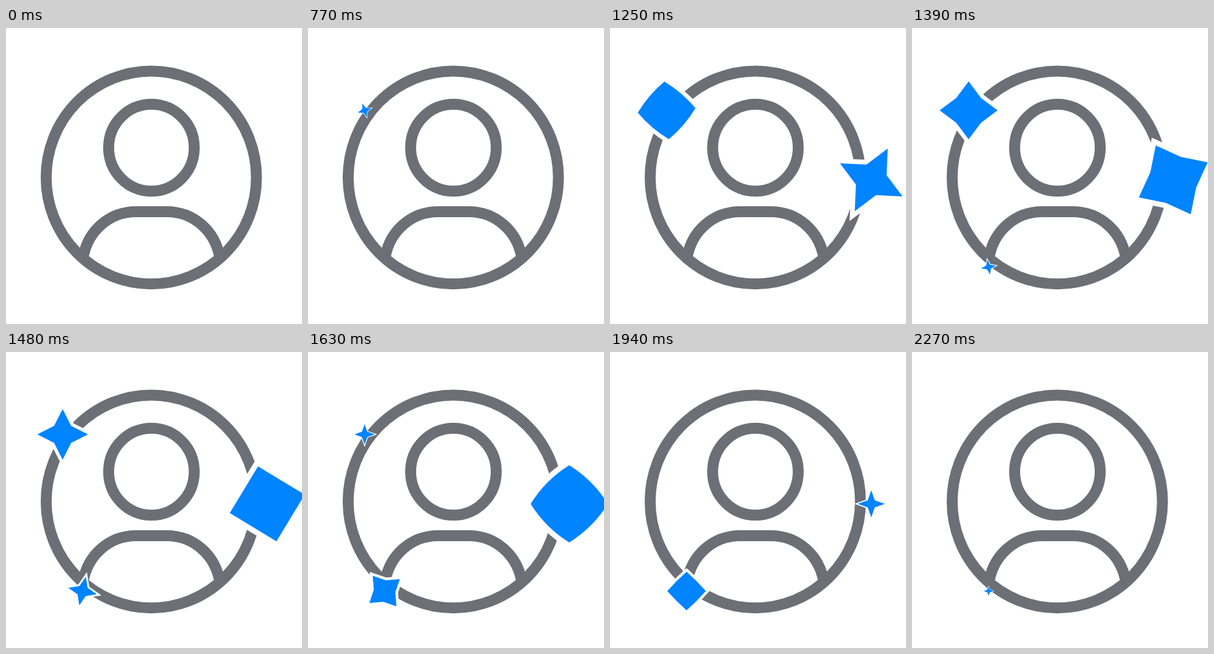
Write an HTML page that moves like this. It is 460x460 px and loops after 2340 ms.

```html
<!DOCTYPE html>
<html lang="en">
<head>
<meta charset="utf-8">
<title>Sparkling avatar</title>
<style>
  html, body { margin: 0; width: 100%; height: 100%; overflow: hidden; background: #fff; }
  svg { display: block; width: 100%; height: 100%; }
  .icon { fill: none; stroke: #6c6f76; stroke-width: 17; }
  .spark { fill: #0084ff; stroke: #fff; stroke-miterlimit: 4; paint-order: stroke; }
</style>
</head>
<body>
<svg viewBox="0 0 460 460">
  <g class="icon">
    <path d="M120 356C127 316 160 285.5 202 285.5H250C292 285.5 325 316 332 356"/>
    <ellipse cx="226" cy="186" rx="66.5" ry="67.5"/>
    <ellipse cx="225.8" cy="232.3" rx="163.4" ry="165.4"/>
  </g>
  <path class="spark"/>
  <path class="spark"/>
  <path class="spark"/>
</svg>
<script>
const LOOP = 2340;
const START = 755;
const POSE = 78.5; // each pose is held this long
// A sparkle's life, counted in poses
const GROWN = 3, SETTLED = 7, FADE = 8, END = 12;

const nodes = document.querySelectorAll('.spark');
const sparks = [
  { x: 88, y: 128, r: 45, first: 0 },
  { x: 406, y: 236, r: 60, first: 4 },
  { x: 119, y: 371.5, r: 30, first: 7.7 }
];

const clamp = v => Math.min(1, Math.max(0, v));
const smooth = v => v * v * (3 - 2 * v);

function sizeAt(age) {
  const grow = 1 - .75 * clamp(1 - age / GROWN) ** 2;
  const fade = 1 - clamp((age - FADE) / (END - FADE)) ** 1.5;
  return Math.min(grow, fade);
}

// Distance from the centre to the middle of each side; the tips are at 1.
function waistAt(age) {
  const swell = age < SETTLED
    ? smooth(age / SETTLED)
    : clamp(1 - (age - SETTLED) / 4) ** 2;
  return .37 + .42 * swell;
}

const turnAt = age => -108 * clamp(1 - age / SETTLED) ** 1.64;

function polar(radius, quarterTurns) {
  const a = quarterTurns * Math.PI / 2;
  return (radius * Math.sin(a)).toFixed(4) + ' ' + (-radius * Math.cos(a)).toFixed(4);
}

// Sides are notched when they dip inwards and curved when they bulge.
function outline(waist) {
  const bulges = waist > Math.SQRT1_2;
  const mid = bulges ? 2 * waist - Math.SQRT1_2 : waist;
  let d = 'M' + polar(1, 0);
  for (let i = 0; i < 4; i++) {
    d += (bulges ? 'Q' : 'L') + polar(mid, i + .5) + ' ' + polar(1, i + 1);
  }
  return d + 'Z';
}

function draw(t) {
  const pose = Math.floor((t - START) / POSE);
  sparks.forEach(({ x, y, r, first }, i) => {
    const age = pose - first;
    const shown = pose >= 0 && age >= 0 && age < END;
    nodes[i].style.display = shown ? '' : 'none';
    if (!shown) return;
    const size = sizeAt(age);
    nodes[i].setAttribute('d', outline(waistAt(age)));
    nodes[i].setAttribute('stroke-width', .28 * Math.sqrt(size));
    nodes[i].setAttribute('transform',
      `translate(${x} ${y}) rotate(${turnAt(age)}) scale(${r * size})`);
  });
}

let origin;
function tick(now) {
  origin ??= now;
  draw((now - origin) % LOOP);
  requestAnimationFrame(tick);
}
draw(0);
requestAnimationFrame(tick);
</script>
</body>
</html>
```
